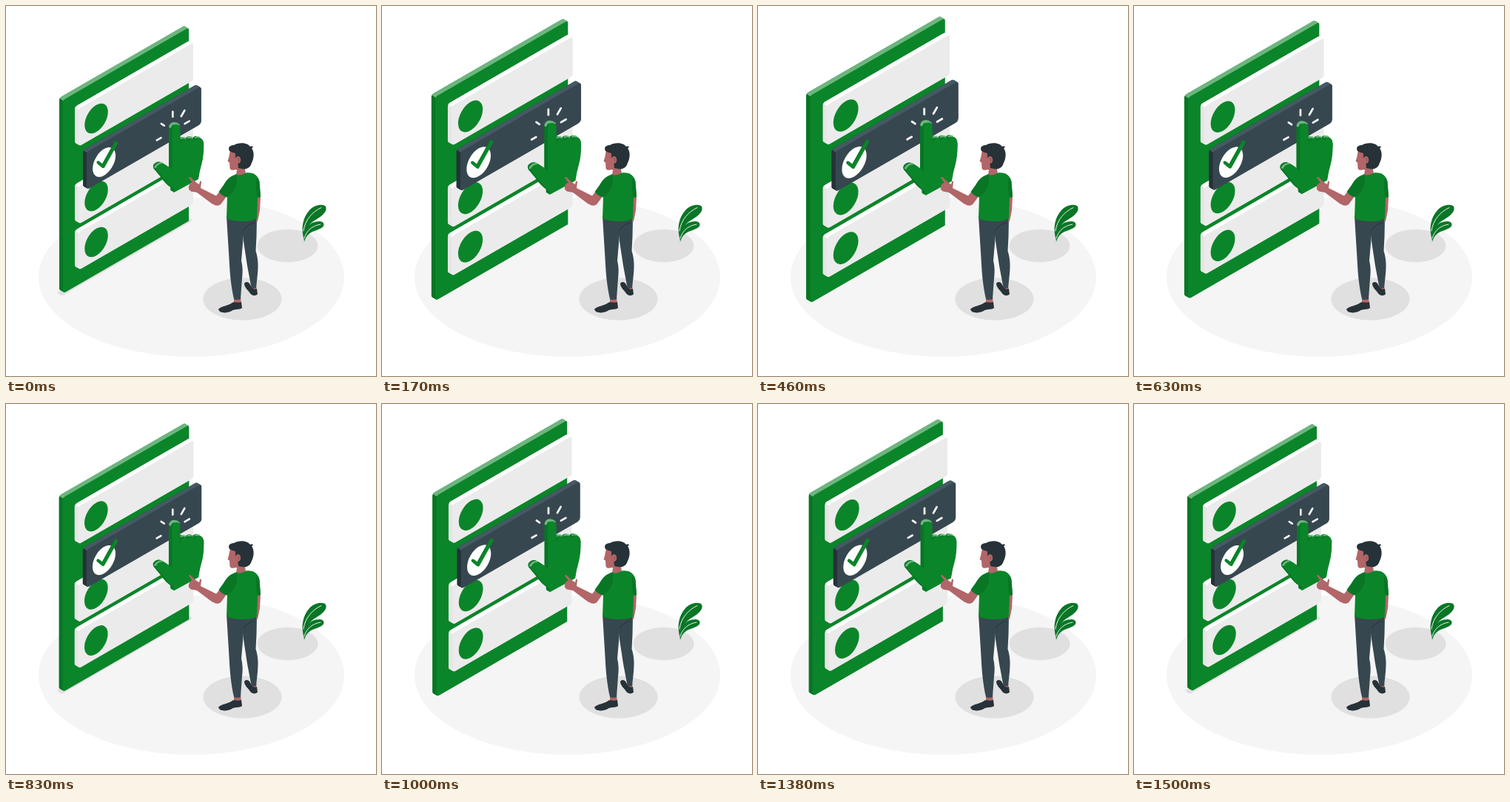
Write an HTML page with a canvas that moves like this. It is 500 px wide and 500 px high and loops after 1.54 s.

```html
<!DOCTYPE html>
<html lang="en">
<head>
<meta charset="utf-8">
<title>Choosing an option</title>
<style>
  html, body { margin: 0; width: 100%; height: 100%; overflow: hidden; background: #fff; }
  canvas { display: block; width: 500px; height: 500px; }
</style>
</head>
<body>
<canvas id="stage" width="500" height="500"></canvas>
<script>
const ctx = document.getElementById('stage').getContext('2d');
const LOOP = 1540, STEPS = 37, ISO = 0.577;
const GREEN = '#0b8529', SHADE = '#097626', LIGHT = '#6db67f';
const SKIN = '#b16668', SLATE = '#37474f', INK = '#263238';

// [time in ms, extra scale], linear in between
const BEAT = [[0, 0], [305, 0.1], [858, 0], [1188, 0.095], [1484, 0], [LOOP, 0]];

function beatAt(time) {
  const i = BEAT.findIndex(([t]) => time < t);
  const [t0, v0] = BEAT[i - 1], [t1, v1] = BEAT[i];
  return 1 + v0 + (v1 - v0) * (time - t0) / (t1 - t0);
}

function fill(path, color) {
  ctx.fillStyle = color;
  ctx.fill(new Path2D(path));
}

function stroke(path, color, width) {
  ctx.strokeStyle = color;
  ctx.lineWidth = width;
  ctx.lineCap = 'round';
  ctx.lineJoin = 'round';
  ctx.stroke(new Path2D(path));
}

function ellipse(x, y, rx, ry, color) {
  ctx.fillStyle = color;
  ctx.beginPath();
  ctx.ellipse(x, y, rx, ry, 0, 0, Math.PI * 2);
  ctx.fill();
}

function scaled(cx, cy, scale, draw) {
  ctx.save();
  ctx.translate(cx, cy);
  ctx.scale(scale, scale);
  ctx.translate(-cx, -cy);
  draw();
  ctx.restore();
}

function isoRect(x, y, w, h, r, color) {
  ctx.save();
  ctx.transform(1, -ISO, 0, 1, x, y);
  ctx.fillStyle = color;
  ctx.beginPath();
  ctx.roundRect(0, 0, w, h, r);
  ctx.fill();
  ctx.restore();
}

function isoDisc(x, y, r, color) {
  ctx.save();
  ctx.transform(0.866, -0.5, 0, 1, x, y);
  ellipse(0, 0, r, r, color);
  ctx.restore();
}

// Upright slab: x, y is the top left corner of its front face
function slab(x, y, w, h, radii, front, side, top) {
  const sweep = color => {
    for (let d = 5; d > 0; d -= 0.5) isoRect(x - d, y - d * ISO, w, h, radii, color);
  };
  sweep(side);
  ctx.save();
  ctx.beginPath();
  ctx.moveTo(x - 20, y - 20 * ISO);
  ctx.lineTo(x + 300, y + 300 * ISO);
  ctx.lineTo(x + 300, y - 400);
  ctx.lineTo(x - 20, y - 400);
  ctx.clip();
  sweep(top);
  ctx.restore();
  isoRect(x, y, w, h, radii, front);
}

function drawFloor() {
  ellipse(250.5, 366.5, 206.5, 107.5, '#f5f5f5');
  ellipse(319.5, 396, 53, 28.7, '#e0e0e0');
  ellipse(380.5, 324, 41, 22.3, '#e0e0e0');
  fill('M69 387 L247 285 L252 290 L77 391 Q73 392 69 387Z', '#e0e0e0');
}

function drawPlant() {
  fill('M403 316 C398 301 401 286 410 276 C417 268 429 267 432 271 C435 277 427 284 420 288 C411 293 404 300 403 316Z', SHADE);
  fill('M403 319 C401 307 406 297 414 293 C421 290 429 290 429.5 295 C430 300 422 302 414 305 C408 308 405 312 403 319Z', SHADE);
  stroke('M402 304 C404 289 414 278 426 272.5', '#fff', 0.9);
  stroke('M403 314 C406 303 414 297 425 295', '#fff', 0.9);
}

function drawBoard() {
  slab(77, 127.2, 170, 261.4, [3, 3, 0, 4], GREEN, SHADE, LIGHT);
  for (const bottom of [190, 295, 357]) {
    slab(98, bottom - 51, 155, 51, [3, 3, 3, 4], '#ebebeb', '#e6e6e6', '#fff');
    isoDisc(122, bottom - 38, 18.2, GREEN);
  }
  slab(109, 197.5, 154.8, 51, [3, 4, 4, 4], SLATE, INK, '#455a64');
  isoDisc(132.6, 211, 17.9, '#fff');
  const tick = 'M125.5 212 L131.5 217 L149.3 185';
  ctx.save();
  ctx.translate(-1, -0.6);
  stroke(tick, SHADE, 4);
  ctx.restore();
  stroke(tick, GREEN, 4);
}

function drawPointer() {
  for (const ray of ['M203.8 181.4 L209.5 178.2', 'M209.8 159 L213.8 161.7',
    'M225.3 142.7 V149.8', 'M241.3 141.2 L236.8 149', 'M241.5 159.2 L247.8 155.5']) {
    stroke(ray, '#fff', 2.6);
  }
  const hand = 'M224.5 167 Q225 160.5 230 160 Q235.5 160 235.5 166 L235.5 188 L237 183 Q239 179 243.5 180'
    + ' L246.5 183 Q248 178.5 253 179 L256.5 182 Q258 178 262 178.5 Q267 179.5 267.3 187'
    + ' Q267.3 203 264.5 213 Q261.5 223 260 234 L227 252 L226.5 247 Q220 243 214 234 L204 222'
    + ' Q201.5 217 207 214 Q211 212 215 214.5 L224.5 221Z';
  for (let d = 4.5; d > 0; d -= 0.5) {
    ctx.save();
    ctx.translate(-d, -d * ISO);
    fill(hand, SHADE);
    ctx.restore();
  }
  // lit upper rims of the fingertip, thumb and knuckles
  stroke('M221.8 163 Q223 158.6 227.5 158.6 Q231 158.8 233 161', LIGHT, 3.4);
  stroke('M201.8 217.5 Q205 212.8 210 212.6', LIGHT, 3);
  stroke('M236.5 179 Q239.5 177 242.5 179 M246 178.3 Q249 176.5 252 178.2 M256 177.8 Q258.5 176.3 261 177.6', LIGHT, 2);
  fill(hand, GREEN);
}

function drawMan() {
  // legs and shoes
  fill('M332 377 L338 377 L339 386 L332 384Z', SKIN);
  fill('M308 393 L317 393 L318 403 L308 402Z', SKIN);
  fill('M322 376 C322 372 328 372 330 376.5 C332 381 336 384 339 382 L340 389.5 C336 393 331 391 329 387 C326 383 323 381 322 376Z', INK);
  fill('M287 410 C290 405.5 298 406 305 401.5 C308 398.5 311 402 318 400 L319 408 C315 411 309 409 305 412 C299 415 289 416 287 410Z', INK);
  fill('M318 287 L339 286 L338.5 311 L337.5 331 C341 342 341 351 340 362 L338 381 Q334 382 331.5 380 L326 351 L321 318 L320 300Z', SLATE);
  fill('M298 284 C308 291 330 291 339 286 L337 292 Q325 296 321.5 303 L318 344 C320 352 320 360 319 368 L317 396 Q312 398 308 396 C304 378 302.5 361 301.8 346Z', SLATE);
  stroke('M335 293 Q324 296 321.5 303', INK, 1);
  // arms
  fill('M339 257 L344 257 L343 276 L340 291 L338 290Z', SKIN);
  fill('M247 232 Q248 230 250 232 L257 238.5 L261 241 L262 237 Q264 235.5 264 238 L263 246 L284 256.5 L290 249 L299 256 L291 267 C288 271 283 270 278 267 L258 252 L250 250.5 Q246 248 247 244 L248.5 240 L252 239Z', SKIN);
  // head
  fill('M303 195 L301 205 L299.5 210 L302 211.5 L302.5 219 Q303 222.5 308 221.5 L312 221 L311 229 Q318 232 324 227 L322 214 L326 199 L315 191Z', SKIN);
  fill('M302 196 C299 190 304 188 308 188 C314 184 326 184 330 190 Q333 188 334 191 L332 192 C336 198 335 206 332 212 C330 219 325 221 319 220 L314 219 L313 210 L310 205 L310 199 Q305 198 302 196Z', INK);
  ellipse(313.5, 208, 3.7, 5, SKIN);
  stroke('M313 206 Q315.5 206 314.5 210', '#8f4a4e', 0.9);
  // shirt
  fill('M311 227 C315 230 320 228 324 225.5 C334 224 341 229 342.5 237 L344 258 L340 259 L339 287.5 C330 292.5 308 292 298 287 L299 258 Q302 231 311 227Z', GREEN);
  fill('M311 228 C303 229 298 235 294 242 L287.5 251 Q292 257 299 258.5 Q308 252 311 243 Q313 234 311 228Z', SHADE);
  fill('M338 233 Q342 234 342.5 239 L344 258 L340 259 Q337 245 338 233Z', SHADE);
}

function render(now) {
  const step = Math.floor((now % LOOP + 4) * STEPS / LOOP) % STEPS;
  const scale = beatAt(step * LOOP / STEPS);
  ctx.fillStyle = '#fff';
  ctx.fillRect(0, 0, 500, 500);
  drawFloor();
  drawPlant();
  scaled(168, 206.7, scale, drawBoard);
  scaled(233.5, 197, scale, drawPointer);
  drawMan();
}

const start = performance.now();
(function tick() {
  render(performance.now() - start);
  requestAnimationFrame(tick);
})();
</script>
</body>
</html>
```
